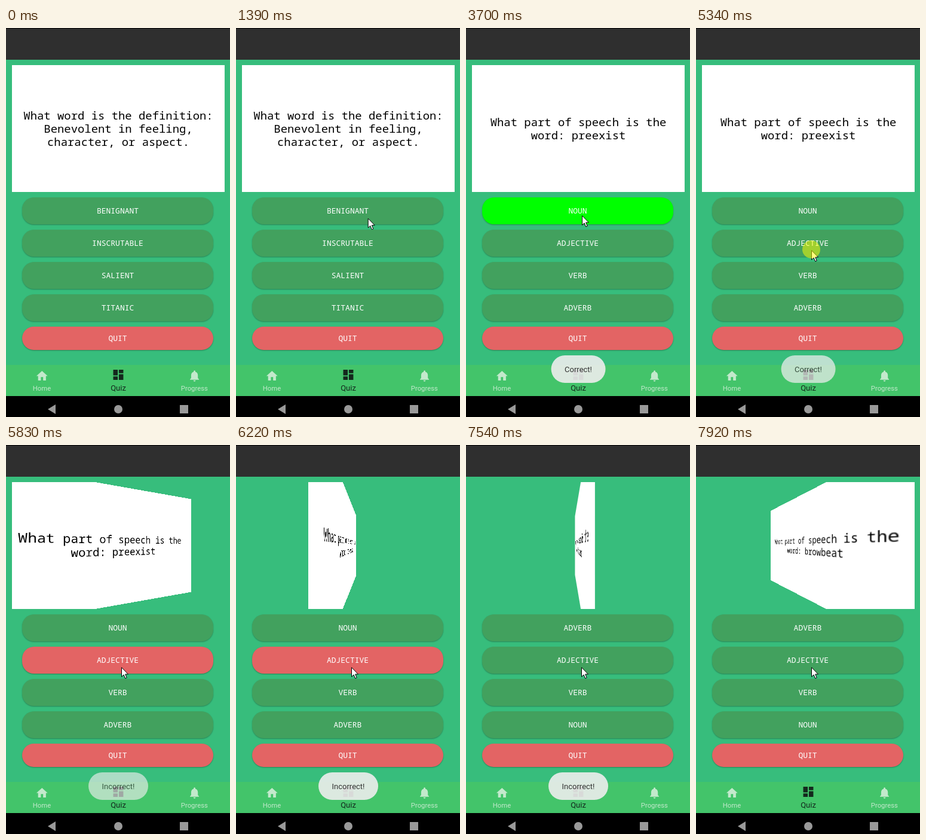
Recreate the animation shown at these times as an HTML page. Size 375 px wide and 650 px high, loop 8000 ms.

```html
<!DOCTYPE html>
<html lang="en">
<head>
<meta charset="utf-8">
<title>Vocabulary quiz</title>
<style>
html, body { margin: 0; width: 100%; height: 100%; overflow: hidden; background: #37bd7c; }
#stage { position: relative; width: 375px; height: 650px; overflow: hidden; background: #37bd7c; }
#stage div, svg { position: absolute; }
.bar { left: 0; width: 375px; }
#view { left: 10px; top: 62px; width: 356px; height: 212px; overflow: hidden; perspective: 205px; }
#card { inset: 0; background: #fff; color: #000; display: flex; align-items: center; justify-content: center;
  text-align: center; white-space: pre; font: 500 18.9px/22px "Noto Sans Mono", "DejaVu Sans Mono", monospace; }
.btn { left: 27px; width: 320px; height: 45px; border-radius: 20px; background: #42a15e; color: #fff; text-align: center;
  font: 13px/45px "Noto Sans Mono", "DejaVu Sans Mono", monospace; box-shadow: 0 1px 2px rgba(0,0,0,.3); }
#quit { top: 499px; height: 39px; line-height: 39px; background: #e36464; font-weight: 500; }
svg { left: 0; top: 0; }
svg text { font: 11.3px Roboto, sans-serif; text-anchor: middle; }
#toast { left: 188px; top: 547px; height: 46px; padding: 0 22.5px; border-radius: 23px; transform: translateX(-50%);
  background: rgba(238,238,238,.9); color: #333; font: 13px/47px Roboto, sans-serif; white-space: nowrap; }
</style>
</head>
<body>
<div id="stage">
  <div class="bar" style="top:0;height:53px;background:#2f2f2f;box-shadow:inset 0 1px #000"></div>
  <div id="view"><div id="card"></div></div>
  <div class="btn" style="top:283px"></div>
  <div class="btn" style="top:337px"></div>
  <div class="btn" style="top:391px"></div>
  <div class="btn" style="top:445px"></div>
  <div class="btn" id="quit">QUIT</div>
  <svg width="375" height="650">
    <path d="M0 563h375v52H0z" fill="#43c46a"/>
    <path d="M0 615h375v35H0z"/>
    <g fill="#c3e9cc">
      <path transform="translate(49 570.2) scale(.94)" d="M10 20v-6h4v6h5v-8h3L12 3 2 12h3v8z"/>
      <path transform="translate(304.3 570) scale(.94)" d="M12 22c1.1 0 2-.9 2-2h-4c0 1.1.9 2 2 2zm6-6v-5c0-3.1-1.6-5.6-4.5-6.3V4c0-.8-.7-1.5-1.5-1.5s-1.5.7-1.5 1.5v.7C7.6 5.4 6 7.9 6 11v5l-2 2v1h16v-1z"/>
      <text x="60" y="606">Home</text>
      <text x="315.3" y="606">Progress</text>
    </g>
    <g fill="#14291d">
      <path transform="translate(176.7 568.2) scale(.94)" d="M3 13h8V3H3zm0 8h8v-6H3zm10 0h8V11h-8zm0-18v6h8V3z"/>
      <text x="188" y="606" style="font-size:13px">Quiz</text>
    </g>
    <g fill="#999">
      <path d="M70 637l13-8v16z"/>
      <circle cx="188" cy="637" r="7"/>
      <path d="M291 630h14v14h-14z"/>
    </g>
  </svg>
  <div id="toast"></div>
  <svg width="375" height="650">
    <g id="mouse">
      <path d="M.5 .7V16.2L4.1 12.9 6.7 19 9.2 18 6.7 12H11.5Z" fill="#fff" stroke="#000"/>
      <circle id="press" cx="0" cy="-1" r="15" fill="#ff0" fill-opacity=".5"/>
    </g>
  </svg>
</div>
<script>
const $ = id => document.getElementById(id);
const card = $('card'), toast = $('toast'), mouse = $('mouse'), press = $('press');
const buttons = [...document.querySelectorAll('.btn')].slice(0, 4);
const clamp = v => Math.min(1, Math.max(0, v));
const ramp = (t, start, length) => clamp((t - start) / length);
const within = (t, a, b) => t >= a && t < b;

const FLIP = 819, CORRECT = 3250, WRONG = 5445, ANSWER = 6392, NEXT = 7371;

// What the card says, from each time on
const cards = [
  [0, 'What word is the definition:\nBenevolent in feeling,\ncharacter, or aspect.'],
  [CORRECT, 'What part of speech is the\nword: preexist'],
  [ANSWER, 'verb'],
  [NEXT, 'What part of speech is the\nword: browbeat']
];
const choices = [
  [0, 'BENIGNANT INSCRUTABLE SALIENT TITANIC'],
  [CORRECT, 'NOUN ADJECTIVE VERB ADVERB'],
  [NEXT, 'ADVERB ADJECTIVE VERB NOUN']
];
// Pointer path: time, x, y
const path = [
  [300, 337, 503], [380, 334, 473], [540, 334, 473], [910, 218, 362], [1010, 218, 362],
  [1240, 222, 338], [1470, 220, 307], [1780, 220, 307], [2000, 213, 314], [2310, 199, 304],
  [2900, 199, 304], [3060, 194, 313], [4650, 194, 313], [5050, 193, 371]
];

const latest = (list, t) => list.filter(e => e[0] <= t).pop()[1];

function pointer(t) {
  const i = path.findIndex(p => p[0] > t);
  if (i < 0) return path.at(-1).slice(1);
  if (i === 0) return path[0].slice(1);
  const [t0, x0, y0] = path[i - 1], [t1, x1, y1] = path[i], k = (t - t0) / (t1 - t0);
  return [x0 + (x1 - x0) * k, y0 + (y1 - y0) * k];
}

// Each turn accelerates; the last one opens from the other side
function angle(t) {
  const turn = start => 90 * ramp(t, start, FLIP) ** 2;
  return t < ANSWER ? turn(WRONG) : t < NEXT ? turn(ANSWER) : turn(NEXT) - 90;
}

function setText(el, text) {
  if (el.textContent !== text) el.textContent = text;
}

function draw(t) {
  const a = angle(t);
  setText(card, latest(cards, t));
  card.style.fontSize = within(t, ANSWER, NEXT) ? '23.6px' : '';
  card.style.visibility = Math.abs(a) > 89.9 ? 'hidden' : '';
  card.style.transform = a ? `translateZ(${-.71 * Math.abs(a)}px) rotateY(${a}deg)` : '';

  const labels = latest(choices, t).split(' ');
  buttons.forEach((b, i) => setText(b, labels[i]));
  buttons[0].style.background = within(t, CORRECT, 4170) ? '#0f0' : '';
  buttons[1].style.background = within(t, WRONG, NEXT) ? '#e36464' : '';

  const first = t < 5580;
  setText(toast, first ? 'Correct!' : 'Incorrect!');
  toast.style.opacity = first
    ? ramp(t, 3300, 400) - ramp(t, 5290, 270)
    : ramp(t, 5580, 350) - ramp(t, 7560, 300);

  const [x, y] = pointer(t);
  mouse.setAttribute('transform', `translate(${x} ${y})`);
  mouse.style.display = t < 300 ? 'none' : '';
  press.style.display = within(t, 3080, 3240) || within(t, 5270, 5430) ? '' : 'none';
}

const begin = performance.now();
function frame() {
  draw((performance.now() - begin) % 8000);
  requestAnimationFrame(frame);
}
frame();
</script>
</body>
</html>
```
